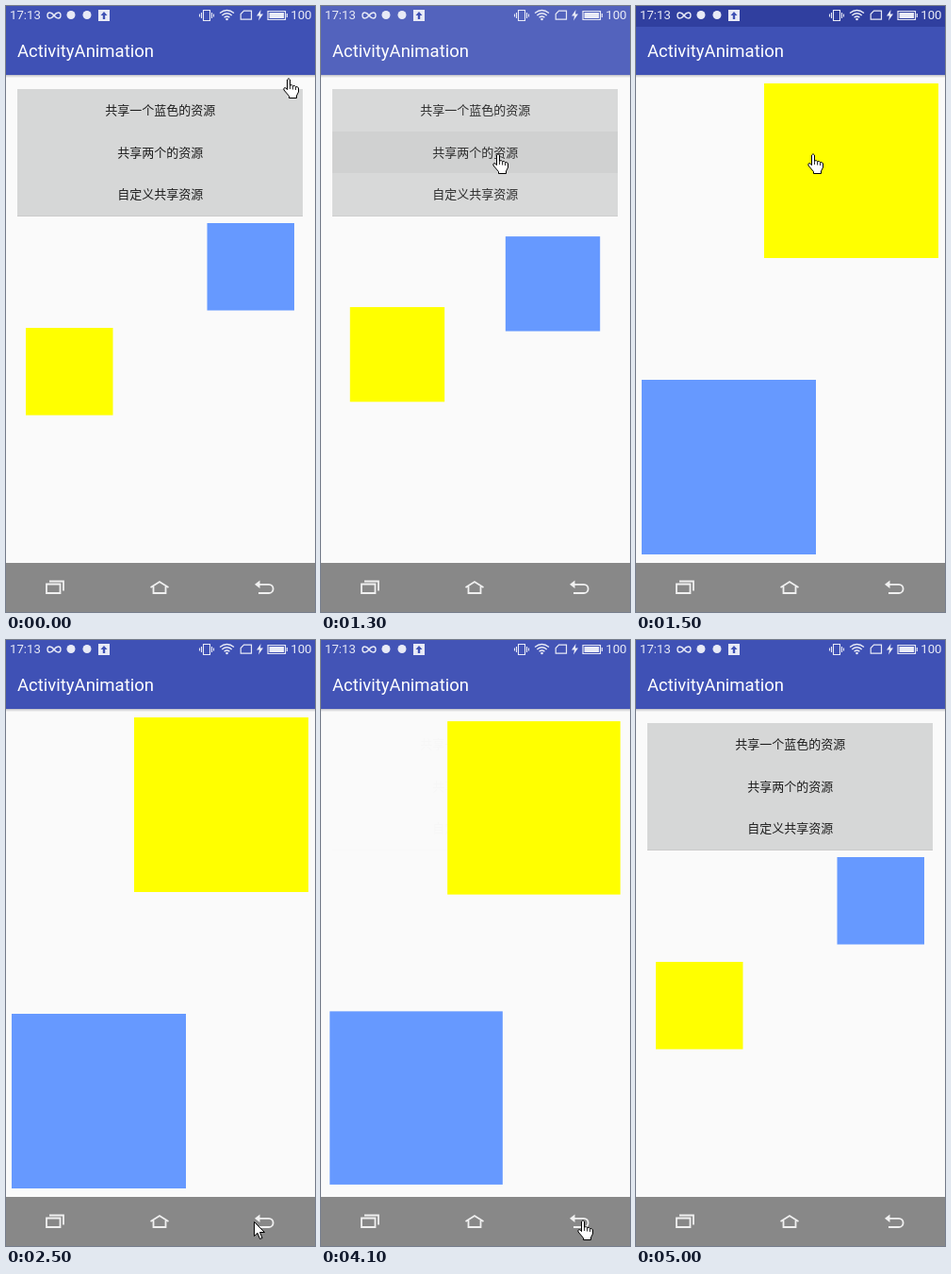
Write an HTML page with a canvas that moves like this. It is 328x642 px and loops after 5400 ms.

```html
<!DOCTYPE html>
<html lang="zh">
<head>
<meta charset="utf-8">
<style>
  html, body { margin: 0; width: 100%; height: 100%; overflow: hidden; background: #fafafa; }
  canvas { display: block; }
</style>
</head>
<body>
<canvas id="stage" width="328" height="642"></canvas>
<script>
const ctx = document.getElementById('stage').getContext('2d');
const LOOP = 5400, STEP = 100;
const PAPER = '#fafafa', INK = '#e8eaf6';

const clamp = v => Math.max(0, Math.min(1, v));
const mix = (a, b, k) => a + (b - a) * k;
const mixAll = (a, b, k) => a.map((v, i) => mix(v, b[i], k));
const smooth = k => k * k * (3 - 2 * k);

// cubic-bezier(.4, 0, .2, 1), solved by bisection
function fastOutSlowIn(t) {
  if (t <= 0 || t >= 1) return clamp(t);
  let lo = 0, hi = 1, s;
  for (let i = 0; i < 20; i++) {
    s = (lo + hi) / 2;
    const x = 1.2 * s * (1 - s) ** 2 + 0.6 * (1 - s) * s * s + s ** 3;
    if (x < t) lo = s; else hi = s;
  }
  return s * s * (3 - 2 * s);
}

function rect(color, x, y, w, h) {
  ctx.fillStyle = color;
  ctx.fillRect(x, y, w, h);
}

function text(str, x, y, font, color, align = 'left') {
  ctx.font = font;
  ctx.fillStyle = color;
  ctx.textAlign = align;
  ctx.fillText(str, x, y);
}

function stroke(d, color, width) {
  ctx.strokeStyle = color;
  ctx.lineWidth = width;
  ctx.stroke(new Path2D(d));
}

function fill(d, color) {
  ctx.fillStyle = color;
  ctx.fill(new Path2D(d));
}

function dot(x, y, r) {
  ctx.beginPath();
  ctx.arc(x, y, r, 0, 2 * Math.PI);
  ctx.fillStyle = INK;
  ctx.fill();
}

function drawStatus(t) {
  const font = '13.2px Roboto, sans-serif';
  text('17:13', 4, 14, font, INK);
  text('100', 324.5, 14, font, INK, 'right');
  stroke('M51 10C48 6 44 6 44 10S48 14 51 10S58 6 58 10S54 14 51 10', INK, 1.4);
  dot(69, 9.5, 4.5);
  dot(86, 9.5, 4.5);
  rect(INK, 98, 4, 12, 12);
  fill('M104 6L107.5 10H105.2V14H102.8V10H100.5Z', '#3f51b5');
  stroke('M209.5 4.5H216.5V15.5H209.5ZM207.5 7V13M218.5 7V13M205.5 8.5V11.5M220.5 8.5V11.5', INK, 1.1);
  stroke('M227 7.5Q234.5 1.5 242 7.5M229.3 10Q234.5 5.6 239.7 10M231.6 12.3Q234.5 9.8 237.4 12.3', INK, 1.4);
  dot(234.5, 14, 1.3);
  if (t >= 4200 && t < 5000) fill('M238 12H243L240.5 16Z', INK);
  stroke('M252.5 5.2H260.5V14.2H249.2V8.5Z', INK, 1.2);
  fill('M270.5 4L266 10.5H269L268 15.5L273 8.5H270Z', INK);
  stroke('M278 5.5H296.5V14.5H278ZM298.3 8V12', INK, 1.2);
  rect(INK, 279.5, 7, 15.5, 6);
}

function drawHeader(t, wash) {
  rect('#3f51b5', 0, 0, 328, 73);
  if (t >= 1500 && t < 1700) {
    ctx.globalAlpha = (1700 - t) / 200;
    rect('#303f9f', 0, 0, 328, 22);
    ctx.globalAlpha = 1;
  }
  ctx.globalAlpha = wash;
  rect(PAPER, 0, 0, 328, 73);
  ctx.globalAlpha = 1;
  rect('#c9c9cd', 0, 73, 328, 1);
  rect('#dfdfe0', 0, 74, 328, 1);
  rect('#f0f0f0', 0, 75, 328, 1);
  text('ActivityAnimation', 12, 54, '18.5px Roboto, sans-serif', '#fff');
  drawStatus(t);
}

function drawButtons(t, alpha) {
  if (alpha <= 0) return;
  ctx.globalAlpha = alpha;
  rect('#cbcbcb', 12, 222, 303, 1);
  rect('#d6d7d7', 12, 88, 303, 134);
  if (t >= 1000 && t < 1500) rect('rgba(0,0,0,.04)', 12, 133, 303, 44);
  ['共享一个蓝色的资源', '共享两个的资源', '自定义共享资源'].forEach((label, i) =>
    text(label, 163.7, 115 + 44.5 * i, '13px "Noto Sans CJK SC", "Noto Sans CJK", sans-serif', '#1c1c1c', 'center'));
  ctx.globalAlpha = 1;
}

function drawNav() {
  rect('#888', 0, 590, 328, 52);
  const c = '#f0f0f0';
  stroke('M44 612.5H57.5V622H43V612.5ZM46 609.5H61V619.5', c, 1.8);
  stroke('M153.5 616L163 610L172.5 616M156.5 615V622H169.5V615', c, 1.8);
  stroke('M267 612.8H279A4.6 4.6 0 0 1 279 622H268', c, 1.8);
  fill('M269.5 608.5V617L264 612.8Z', c);
}

const HAND = 'M4.5 2Q6 -.7 7.5 2V8Q9.7 7 10.5 8.7Q12.7 7.9 13.5 9.6Q16 9.2 16.5 11V15L14.5 19V21.5H6.5V19.5L1 13Q.2 11 2 10.6Q3.5 10.6 4.5 12.6Z';
const ARROW = 'M.5 .5V15.5L4 12.3L6.5 18.5L9 17.5L6.5 11.5H11.5Z';

function drawCursor(t) {
  if (t >= 4500) return;
  const start = [294, 76], button = [182, 156], corner = [263, 616];
  let pos = mixAll(start, button, smooth(clamp(t / 400)));
  if (t >= 2000) pos = mixAll(button, corner, smooth(clamp((t - 1900) / 600)));
  if (t >= 2700) pos = [260, 617];
  if (t >= 2900) pos = [272, 614];
  const arrow = t >= 2400 && t < 2700;
  ctx.save();
  ctx.translate(Math.round(pos[0]), Math.round(pos[1]));
  fill(arrow ? ARROW : HAND, '#fff');
  stroke(arrow ? ARROW : HAND, '#000', 1);
  if (!arrow) stroke('M7.5 8V12M10.5 9V12.5M13.5 10V13', '#000', 0.8);
  ctx.restore();
}

// Each square as [x, y, size], on the list screen and on the detail screen
const SQUARES = [
  { color: '#6699ff', list: [213.5, 230, 92.5], detail: [6, 396, 185] },
  { color: '#ffff00', list: [21, 341, 92.5], detail: [136, 82, 185] }
];

function draw(t) {
  const p = fastOutSlowIn((t - 1260) / 240) - fastOutSlowIn((t - 4076) / 300);
  rect(PAPER, 0, 0, 328, 642);
  drawHeader(t, 1.35 * p * (1 - p));
  drawButtons(t, 1 - p);
  for (const { color, list, detail } of SQUARES) {
    const [x, y, size] = mixAll(list, detail, p);
    rect(color, x, y, size, size);
  }
  drawNav();
  drawCursor(t);
}

const began = performance.now();
function tick() {
  const t = (performance.now() - began) % LOOP;
  draw(Math.floor(t / STEP) * STEP);
  requestAnimationFrame(tick);
}
tick();
</script>
</body>
</html>
```
